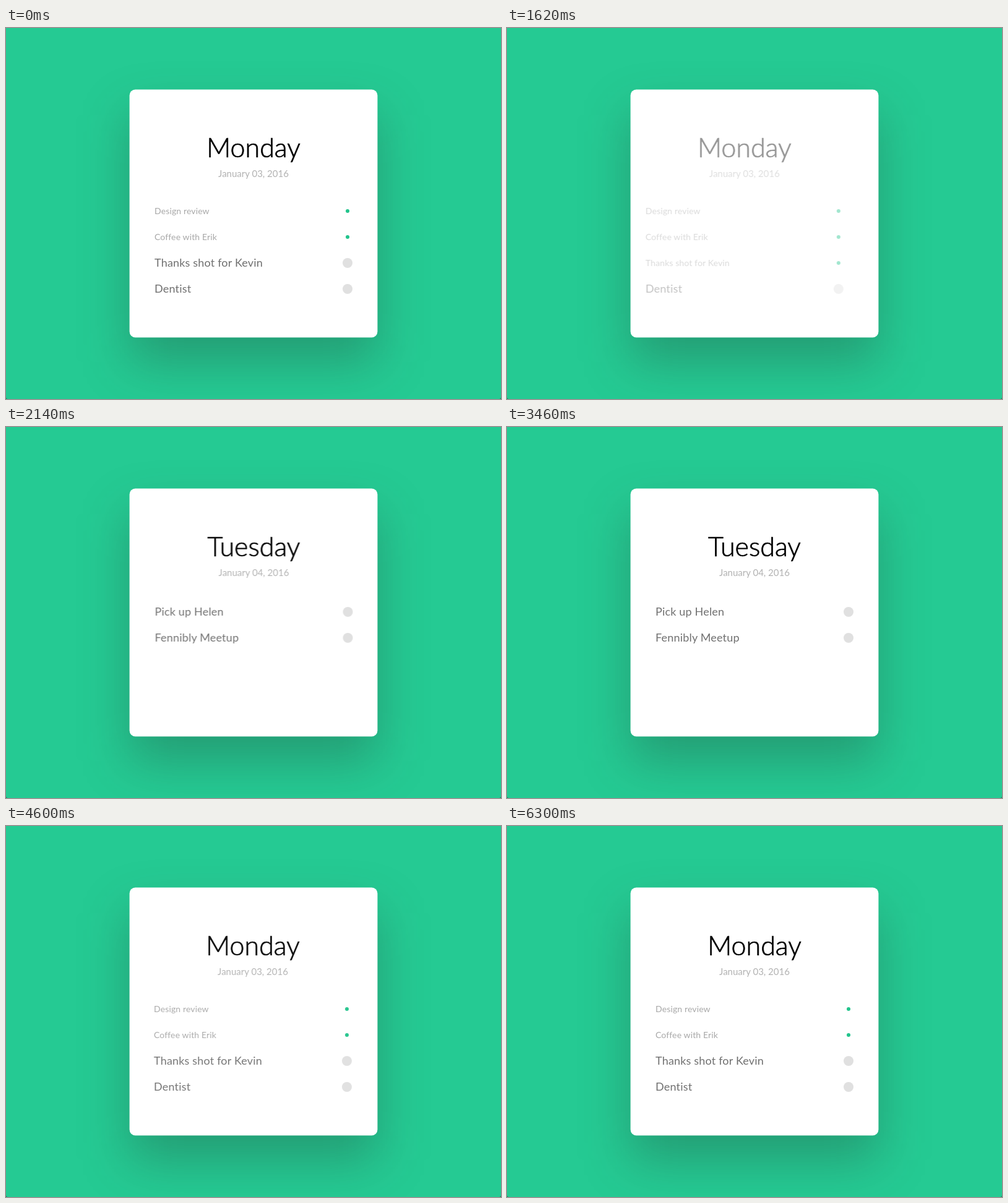
An HTML page for the animation above (6320 ms loop, 800 by 600 pixels).

```html
<!DOCTYPE html>
<html lang="en">
<head>
<meta charset="utf-8">
<title>Day planner</title>
<style>
  html, body { margin: 0; width: 100%; height: 100%; overflow: hidden; background: #25ca93; }
  svg { display: block; width: 800px; height: 600px; }
  text { font-family: Lato, "Open Sans", sans-serif; }
  .title { font-size: 43px; font-weight: 300; text-anchor: middle; fill: #000; stroke: #000; stroke-width: .7px; }
  .date { font-size: 15px; text-anchor: middle; fill: #b2b2b2; }
  .task { font-size: 18px; letter-spacing: .01em; }
</style>
</head>
<body>
<svg id="stage" viewBox="0 0 800 600">
  <defs>
    <filter id="blur" filterUnits="userSpaceOnUse" x="0" y="0" width="800" height="740">
      <feGaussianBlur stdDeviation="40" color-interpolation-filters="sRGB"/>
    </filter>
  </defs>
  <rect width="800" height="600" fill="#25ca93"/>
  <rect x="200" y="140" width="400" height="400" rx="10" fill="#22322d" fill-opacity=".3" filter="url(#blur)"/>
  <path d="M0 597Q0 600 3 600H0ZM800 597Q800 600 797 600H800Z" fill="#1c6b52"/>
  <rect x="199.6" y="99.6" width="400.8" height="400.8" rx="9.4" fill="#fff"/>
</svg>
<script>
const LOOP = 6320;
const TRAVEL = 28;
const LEAVE = 300;
const ENTER = 800;
const TO_TUESDAY = 1671;
const TO_MONDAY = 4228;
const CHECK = { start: 80, length: 400 };

const stage = document.getElementById('stage');
const clamp = v => Math.min(1, Math.max(0, v));
const mix = (a, b, k) => a + (b - a) * k;
const mixColor = (a, b, k) => `rgb(${a.map((v, i) => Math.round(mix(v, b[i], k)))})`;
const cubicIn = p => p ** 3;
const cubicOut = p => 1 - (1 - p) ** 3;
const expoOut = p => p >= 1 ? 1 : 1 - 2 ** (-10 * p);

function add(parent, tag, attrs, text = '') {
  const el = document.createElementNS('http://www.w3.org/2000/svg', tag);
  for (const key in attrs) el.setAttribute(key, attrs[key]);
  el.textContent = text;
  parent.append(el);
  return el;
}

function makeTask(parent, label, y) {
  const row = add(parent, 'g', { transform: `translate(240 ${y})` });
  const text = add(row, 'text', { class: 'task', y: 6.3 }, label);
  const dot = add(row, 'circle', { cx: 312 });
  return done => {
    text.setAttribute('transform', `scale(${mix(1, 14 / 18, done)})`);
    text.setAttribute('fill', mixColor([112, 112, 112], [168, 168, 168], done));
    dot.setAttribute('r', mix(8, 3, done));
    dot.setAttribute('fill', mixColor([224, 224, 224], [34, 196, 140], done));
  };
}

function makeDay(title, date, firstY, labels, doneCount) {
  const group = add(stage, 'g', {});
  add(group, 'text', { class: 'title', x: 400, y: 209 }, title);
  add(group, 'text', { class: 'date', x: 400, y: 241 }, date);
  const tasks = labels.map((label, i) => {
    const setDone = makeTask(group, label, firstY + 42 * i);
    setDone(i < doneCount ? 1 : 0);
    return setDone;
  });
  const place = (visible, x) => {
    group.setAttribute('visibility', visible ? 'visible' : 'hidden');
    group.setAttribute('transform', `translate(${x.toFixed(3)} 0)`);
    group.setAttribute('opacity', clamp(1 - Math.abs(x) / TRAVEL));
  };
  return { tasks, place };
}

const monday = makeDay('Monday', 'January 03, 2016', 296,
  ['Design review', 'Coffee with Erik', 'Thanks shot for Kevin', 'Dentist'], 2);
const tuesday = makeDay('Tuesday', 'January 04, 2016', 299,
  ['Pick up Helen', 'Fennibly Meetup'], 0);

const leaving = (t, swap) => TRAVEL * cubicIn(clamp((t - swap + LEAVE) / LEAVE));
const entering = (t, swap) => TRAVEL * (1 - expoOut(clamp((t - swap) / ENTER)));

function render(t) {
  const onTuesday = t >= TO_TUESDAY && t < TO_MONDAY;
  const mondayX = t < TO_TUESDAY ? -leaving(t, TO_TUESDAY) : -entering(t, TO_MONDAY);
  const tuesdayX = entering(t, TO_TUESDAY) + leaving(t, TO_MONDAY);
  monday.place(!onTuesday, mondayX);
  tuesday.place(onTuesday, tuesdayX);
  const checked = t < TO_MONDAY ? cubicOut(clamp((t - CHECK.start) / CHECK.length)) : 0;
  monday.tasks[2](checked);
}

const begin = performance.now();
function tick() {
  render((performance.now() - begin) % LOOP);
  requestAnimationFrame(tick);
}
render(0);
tick();
</script>
</body>
</html>
```
